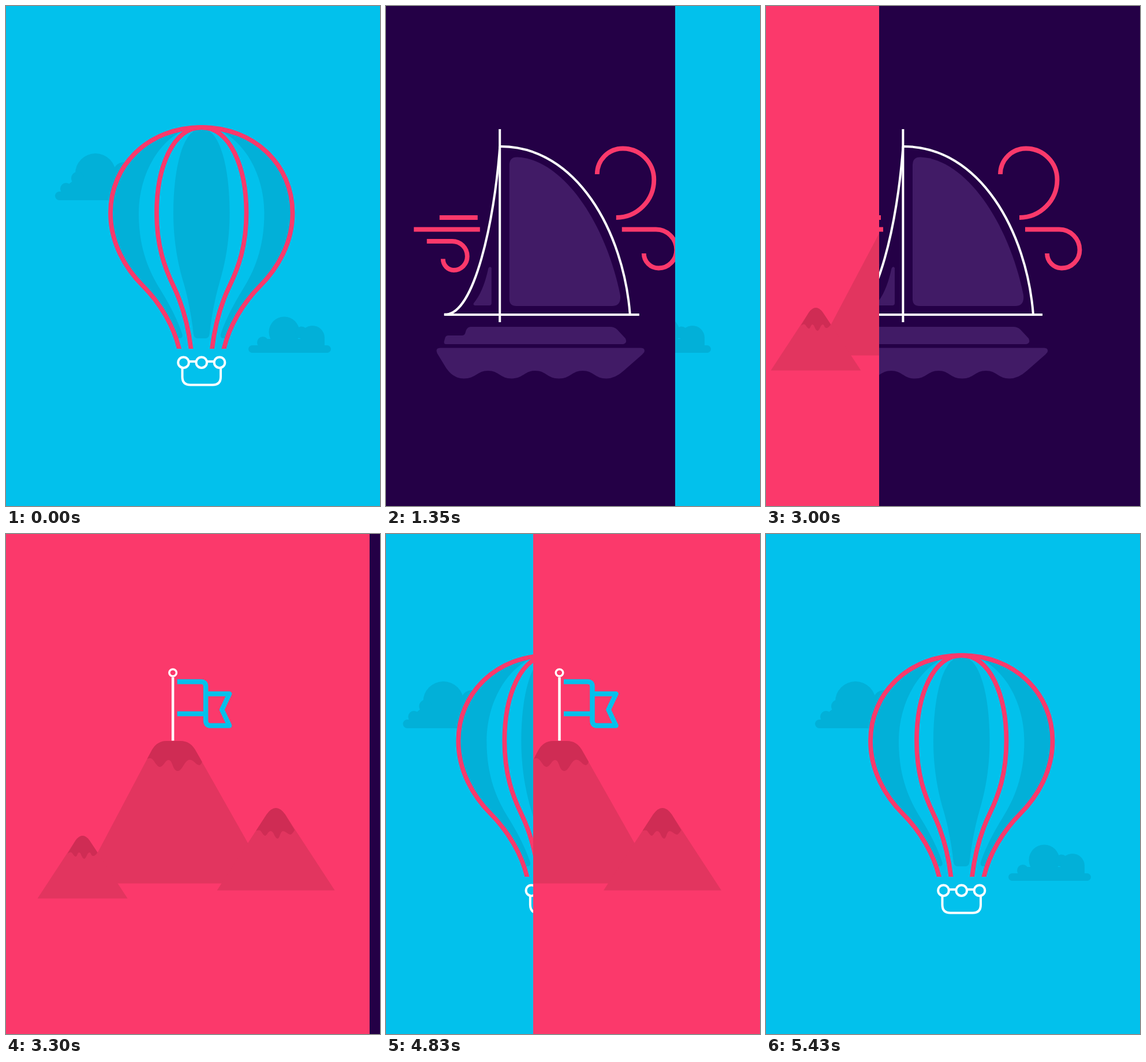
Recreate the animation shown at these times as an HTML page. Size 648x865 px, loop 5.46 s.

```html
<!DOCTYPE html>
<html lang="en">
<head>
<meta charset="utf-8">
<title>Balloon, boat, summit</title>
<style>
  html, body { margin: 0; width: 100%; height: 100%; overflow: hidden; }
  body { position: relative; background: #02c1ec; }
  .slide { position: absolute; left: 0; top: 0; width: 648px; height: 865px; overflow: hidden; }
  .slide > svg { display: block; position: absolute; left: 0; top: 0; fill: none; }
  #balloon { background: #02c1ec; }
  #boat { background: #240046; }
  #summit { background: #fb396b; }
  .sky { fill: #02b0d8; }
  .pink { stroke: #fb396b; stroke-width: 7.8; }
  .white { stroke: #fff; stroke-width: 4; }
  .violet { fill: #411b66; }
  .rock { fill: #e2355f; }
  .cap { fill: #cf2c54; }
  .flag { stroke: #02c1ec; stroke-width: 8.5; stroke-linejoin: round; }
</style>
</head>
<body>

<div class="slide" id="balloon">
<svg width="648" height="865" viewBox="0 0 648 865">
  <g class="sky">
    <circle cx="155" cy="290" r="35"/>
    <circle cx="124" cy="298" r="11"/>
    <circle cx="104" cy="316" r="10"/>
    <circle cx="205" cy="290" r="20"/>
    <path d="M104 312L124 296H215V336H104Z"/>
    <rect x="85" y="321" width="130" height="15" rx="7.5"/>
    <circle cx="445" cy="582" r="10"/>
    <circle cx="482" cy="564" r="26.5"/>
    <circle cx="512" cy="565" r="10.5"/>
    <circle cx="531" cy="574" r="21"/>
    <path d="M445 576H552V592H437Z"/>
    <rect x="420" y="587" width="143" height="13" rx="6.5"/>
    <path d="M338.75 212C305 212 290 285 290 358C290 410 299 450 308 480C316 508 322 540 325 568Q326 575 332 575H345.5Q351.5 575 352.5 568C355.5 540 361.5 508 369.5 480C378.5 450 387.5 410 387.5 358C387.5 285 372.5 212 338.75 212Z"/>
  </g>
  <svg width="648" height="593">
    <g id="half">
      <path class="sky" d="M338.75 210C247 210 181 275 181 358C181 410 207 454 237 484C262 509 283 540 295 575H301Q307 574 305.5 568C298 545 284 517 267 490C248 459 230 420 230 358C230 300 258 236 312 213Z"/>
      <path class="pink" d="M302 601L300 593C291 555 268 515 237 484C207 454 181 410 181 358C181 275 247 210 338.75 210H340"/>
      <path class="pink" d="M321.5 601L320.5 593C316 555 305 515 290 484C275 453 261 415 261 358C261 278 290 210 338.75 210H340"/>
    </g>
    <use href="#half" transform="translate(677.5) scale(-1 1)"/>
  </svg>
  <g class="white">
    <circle cx="307.5" cy="616.7" r="9.3"/>
    <circle cx="338.75" cy="616.7" r="9.3"/>
    <circle cx="370" cy="616.7" r="9.3"/>
    <path d="M317 615H329M348.5 615H360.5M305.5 626V641.5Q305.5 655.5 319.5 655.5H358Q372 655.5 372 641.5V626"/>
  </g>
</svg>
</div>

<div class="slide" id="boat">
<svg width="648" height="865" viewBox="0 0 648 865">
  <g class="violet">
    <path d="M254 275Q254 261 268 261.5C345 265 420 372 446 500Q448 519 432 519H266Q254 519 254 507Z"/>
    <path d="M194 518Q190 517 193 513C206 497 213 475 217.5 454Q220 449 223 453V514Q223 518 219 518Z"/>
    <path d="M148 570H172Q176 570 177.5 566L179 561Q181.5 555 187 555H428Q436 555 441 560L455 575Q459 583 451 585H144Q140 585 141 580L143 573Q144.5 570 148 570Z"/>
    <path d="M134 591.5H482Q490 592 487.5 599L484 603L452 631Q437 644.5 422 644.5C402 644.5 400 631 381 631S360 644.5 340 644.5C319 644.5 318 631 299 631S278 644.5 258 644.5C238 644.5 236 631 217 631S196 644.5 175 644.5C158 644.5 148 632 143 624L129 601Q125 592 134 591.5Z"/>
  </g>
  <g class="white">
    <path d="M237.4 213V547M141 534H479"/>
    <path d="M237.5 243C228 375 193 530 145 533.5H141"/>
    <path d="M237.5 243H239C370 243 452 390 463 534"/>
  </g>
  <g class="pink">
    <path d="M406 291A44.5 44.5 0 0 1 450.5 246.5A54 54 0 0 1 504.5 300.5A65.5 65.5 0 0 1 439 366"/>
    <path d="M449 386.5H508A35.5 35.5 0 0 1 543.5 422A31.2 31.5 0 0 1 512.5 453.5A25.5 25.5 0 0 1 487 428"/>
    <path d="M133 366H199M88.5 386.5H203"/>
    <path d="M111 407H155A26 26 0 0 1 181 433A23.7 24 0 0 1 157.5 457A18.5 19.5 0 0 1 139 437.5"/>
  </g>
</svg>
</div>

<div class="slide" id="summit">
<svg width="648" height="865" viewBox="0 0 648 865">
  <g class="rock">
    <path d="M142 604.5L264 374Q273 358 290 358H313Q330 358 339 373L470 604.5Z"/>
    <path d="M66 630.5L132 530Q138 522 144 522T156 530L222 630.5Z"/>
    <path d="M377 616.5L463 485Q471 474 479 474T495 485L581 616.5Z"/>
  </g>
  <g class="cap">
    <path d="M256 389L264 374Q273 358 290 358H313Q330 358 339 373L351 394Q350 399 346 400C340 399 337 391 330 390.5C320 391 318 409.5 309 410C299 409 301 391.5 293 391C287 391 285 402 278 403C271 402 268 389 262 388Q258 387.5 256 389Z"/>
    <path d="M118 553L132 530Q138 522 144 522T156 530L170 551Q166 557 162 557C158 556 159 551 156 551C152 551 151 561 147 562C142 561 142 551 138 551C135 551 135 558 132 558C128 557 127 550.5 123 550.5Q120 551 118 553Z"/>
    <path d="M444.5 513.5L463 485Q471 474 479 474T495 485L511.5 512Q507 520 504 520C499 519 496 514 491 514C486 515 486 526.5 482 527C476 526 476 514 470 514C465 514 464 522 460 522C456 521 454 512.5 450 512.5Q447 512 444.5 513.5Z"/>
  </g>
  <g class="white">
    <path d="M300.5 248V357.5" stroke-width="4.5"/>
    <ellipse cx="300.5" cy="240" rx="6.3" ry="5.9" style="stroke-width:3.5"/>
  </g>
  <g class="flag">
    <path d="M308 255.5H349Q357.5 255.5 357.5 264V323Q357.5 331.5 366 331.5H398.5L385.5 304L398.5 276.5H358"/>
    <path d="M308 311H357"/>
  </g>
</svg>
</div>

<script>
  const LOOP = 5460, STEP = 30, WIDTH = 648, LAG = 61;
  const EDGE = { start: 29, length: 26 };   // wipe, in steps
  const ART = { start: 34, length: 25 };    // drawing drifts in behind it
  const GAP = 60;                           // steps between wipes
  const slides = ['boat', 'summit', 'balloon'].map(id => document.getElementById(id));

  function ease(x) {
    x = Math.min(1, Math.max(0, x));
    return x < 0.5 ? 4 * x ** 3 : 1 - 4 * (1 - x) ** 3;
  }

  const progress = (step, part) => ease((step - part.start) / part.length);

  function place(slide, wipe, drift, layer) {
    slide.style.zIndex = layer;
    slide.style.width = Math.round(WIDTH * wipe) + 'px';
    slide.firstElementChild.style.transform = `translateX(${-LAG * (1 - drift)}px)`;
  }

  function draw() {
    const step = Math.floor(performance.now() % LOOP / STEP);
    slides.forEach((slide, i) => {
      const local = step - i * GAP;
      // the balloon also lies at the bottom until its own wipe begins
      if (i === 2 && local < EDGE.start) place(slide, 1, 1, 0);
      else place(slide, progress(local, EDGE), progress(local, ART), i + 1);
    });
    requestAnimationFrame(draw);
  }
  draw();
</script>
</body>
</html>
```
